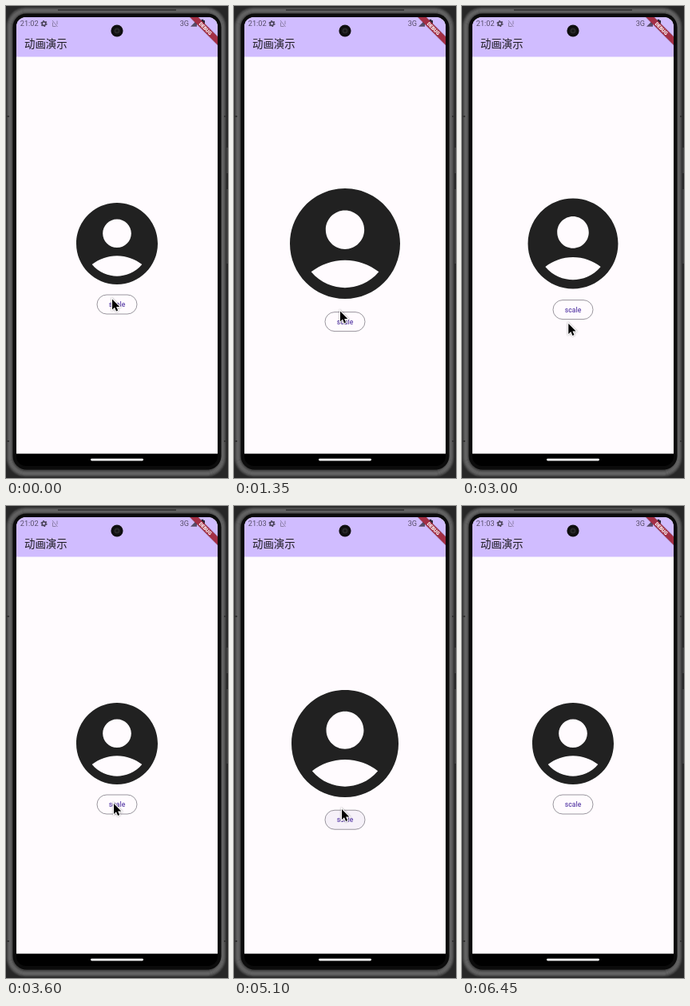
An HTML page that plays this animation: 278x590 px, repeating every 9.96 s.

```html
<!DOCTYPE html>
<html lang="zh-CN">
<head>
<meta charset="utf-8">
<style>
  html, body { margin: 0; width: 100%; height: 100%; overflow: hidden; background: #272727; }
  svg { display: block; width: 278px; height: 590px; }
  text { font-family: Roboto, sans-serif; }
  .title { font: 13.4px "Noto Sans CJK SC", "Noto Sans CJK", sans-serif; }
  #cursor { filter: drop-shadow(0 .6px .8px #0006); }
</style>
</head>
<body>
<svg viewBox="0 0 278 590">
  <defs>
    <clipPath id="glass"><rect x="13" y="14" width="252" height="561" rx="12"/></clipPath>
  </defs>

  <!-- phone body -->
  <rect width="278" height="590" fill="#272727"/>
  <path d="M277 177v32M277 229v93" stroke="#555" stroke-width="1.2"/>
  <g id="rim" fill="none"></g>
  <path d="M65 5h148" stroke="#2c2c2c" stroke-width="1.5"/>
  <path d="M1 138h3M273 138h3M1 544h3M273 544h3" stroke="#333" stroke-width="2"/>
  <rect x="8.5" y="9.5" width="261" height="570" rx="17" fill="#0b0b0b"/>

  <g clip-path="url(#glass)">
    <rect x="13" y="14" width="252" height="546" fill="#fffbfe"/>
    <rect x="13" y="14" width="252" height="49.5" fill="#d0bcff"/>
    <rect x="13" y="559.6" width="252" height="16" fill="#000"/>
    <rect x="106" y="565.8" width="66" height="2.6" rx="1.3" fill="#fff"/>

    <!-- status bar -->
    <g fill="#564d69">
      <text id="clock" x="17.8" y="25.3" font-size="9.2">21:02</text>
      <g fill="none" stroke="#4a4359">
        <circle cx="47.5" cy="22" r="2.3" stroke-width="1.6"/>
        <circle cx="47.5" cy="22" r="3.5" stroke-width="1.2" stroke-dasharray="1.85 1.81"/>
      </g>
      <path d="M58 18l6.5 8M58.5 20.5v5h4M64 18.5v4.5" fill="none" stroke="#85799f" stroke-width=".9"/>
      <text x="217.7" y="25.3" font-size="9.2">3G</text>
      <path d="M231 25.7h8v-8z"/>
      <path d="M243 18h1.7v-1.3h2.6V18H249v8h-6z" fill="#2c2637"/>
    </g>
    <text class="title" x="23" y="52.3" fill="#1d1b20">动画演示</text>

    <!-- corner ribbon -->
    <g transform="translate(265 14) rotate(45)">
      <rect x="-26" y="16.7" width="52" height="8.4" opacity=".2"/>
      <rect x="-26" y="17.2" width="52" height="7.3" fill="#a32f45"/>
      <text x="-.8" y="23" font-size="6.2" font-weight="900" fill="#fff" text-anchor="middle">DEBUG</text>
    </g>
  </g>

  <circle cx="139" cy="31" r="7.6" fill="#0f0f0f"/>
  <circle cx="139" cy="31" r="3.6" fill="#292929"/>
  <circle cx="139" cy="31" r="1.6" fill="#151515"/>

  <path id="avatar" fill="#212121" d="M12 2C6.48 2 2 6.48 2 12s4.48 10 10 10 10-4.48 10-10S17.52 2 12 2zm0 4c1.93 0 3.5 1.57 3.5 3.5S13.93 13 12 13s-3.5-1.57-3.5-3.5S10.07 6 12 6zm0 14c-2.03 0-4.43-.82-6.14-2.88C7.55 15.8 9.68 15 12 15s4.45.8 6.14 2.12C16.43 19.18 14.03 20 12 20z"/>

  <g id="button">
    <rect id="press" x="114" y="-12" width="50" height="24" rx="12" fill="#6750a4"/>
    <rect x="114" y="-12" width="50" height="24" rx="12" fill="none" stroke="#79747e" stroke-width=".75"/>
    <text x="139" y="3" font-size="8.6" font-weight="500" letter-spacing=".06" fill="#6348ac" text-anchor="middle">scale</text>
  </g>

  <path id="cursor" d="M0 0V13L3 10.2 5.1 15 7.2 14 5.1 9.5H9.3Z" stroke="#fff" stroke-width="2" paint-order="stroke"/>
</svg>

<script>
const LOOP = 9960, STEP = 150;   // the picture refreshes once per STEP
const GROW_MS = 1000, SHRINK_MS = 870;
const TAPS = [540, 2478, 4345, 5130];   // taps alternate between grow and shrink
const GLIDES = [                        // cursor moves: start, duration, dx, dy
  [900, 1000, 0, 35], [2800, 800, 2, -29.5], [4700, 600, 0, 9.5], [6000, 400, -60, 6],
];

const el = id => document.getElementById(id);
const clamp = x => Math.min(1, Math.max(0, x));
const smooth = x => x * x * (3 - 2 * x);

// cubic-bezier(.42, 0, 1, 1), solved by bisection
function easeIn(x) {
  let lo = 0, hi = 1;
  for (let i = 0; i < 24; i++) {
    const s = (lo + hi) / 2;
    if (smooth(s) + 1.26 * s * (1 - s) ** 2 < x) lo = s; else hi = s;
  }
  return smooth(hi);
}

function progress(t) {
  return TAPS.reduce((value, tap, i) => {
    const elapsed = Math.max(0, Math.min(t, TAPS[i + 1] ?? LOOP) - tap);
    return clamp(value + (i % 2 ? -elapsed / SHRINK_MS : elapsed / GROW_MS));
  }, 0);
}

// Highlight fades in just before a tap and out after it
function highlight(t) {
  return Math.max(...TAPS.map(tap => clamp(Math.min((t - tap + 100) / 150, (tap + 420 - t) / 250))));
}

function cursorAt(t) {
  return GLIDES.reduce(([x, y], [start, duration, dx, dy]) => {
    const k = smooth(clamp((t - start) / duration));
    return [x + dx * k, y + dy * k];
  }, [133, 366.5]);
}

// Concentric outlines shade the metal rim, brightest midway
function drawRim() {
  for (let i = 0; i < 9; i++) {
    const shade = 48 + 52 * Math.sin(Math.PI * i / 9);
    el("rim").insertAdjacentHTML("beforeend",
      `<rect x="${i + .5}" y="${i + 1.5}" width="${275 - 2 * i}" height="${587 - 2 * i}"
        rx="${24 - i * .8}" stroke="rgb(${shade},${shade},${shade})" stroke-width="1.5"/>`);
  }
}

function draw(now) {
  const t = Math.floor(now % LOOP / STEP) * STEP;
  const grow = easeIn(progress(t));
  const radius = 51 + 25.5 * grow;
  el("avatar").setAttribute("transform", `translate(139 297) scale(${radius / 10}) translate(-12 -12)`);
  el("button").setAttribute("transform", `translate(0 ${373 + 30.6 * grow})`);
  el("press").setAttribute("opacity", .13 * highlight(t));
  el("cursor").setAttribute("transform", `translate(${cursorAt(t)})`);
  el("cursor").setAttribute("visibility", t < 6450 ? "visible" : "hidden");
  el("clock").textContent = t < 4800 ? "21:02" : "21:03";
}

drawRim();
const start = performance.now();
function tick() {
  draw(performance.now() - start);
  requestAnimationFrame(tick);
}
tick();
</script>
</body>
</html>
```
